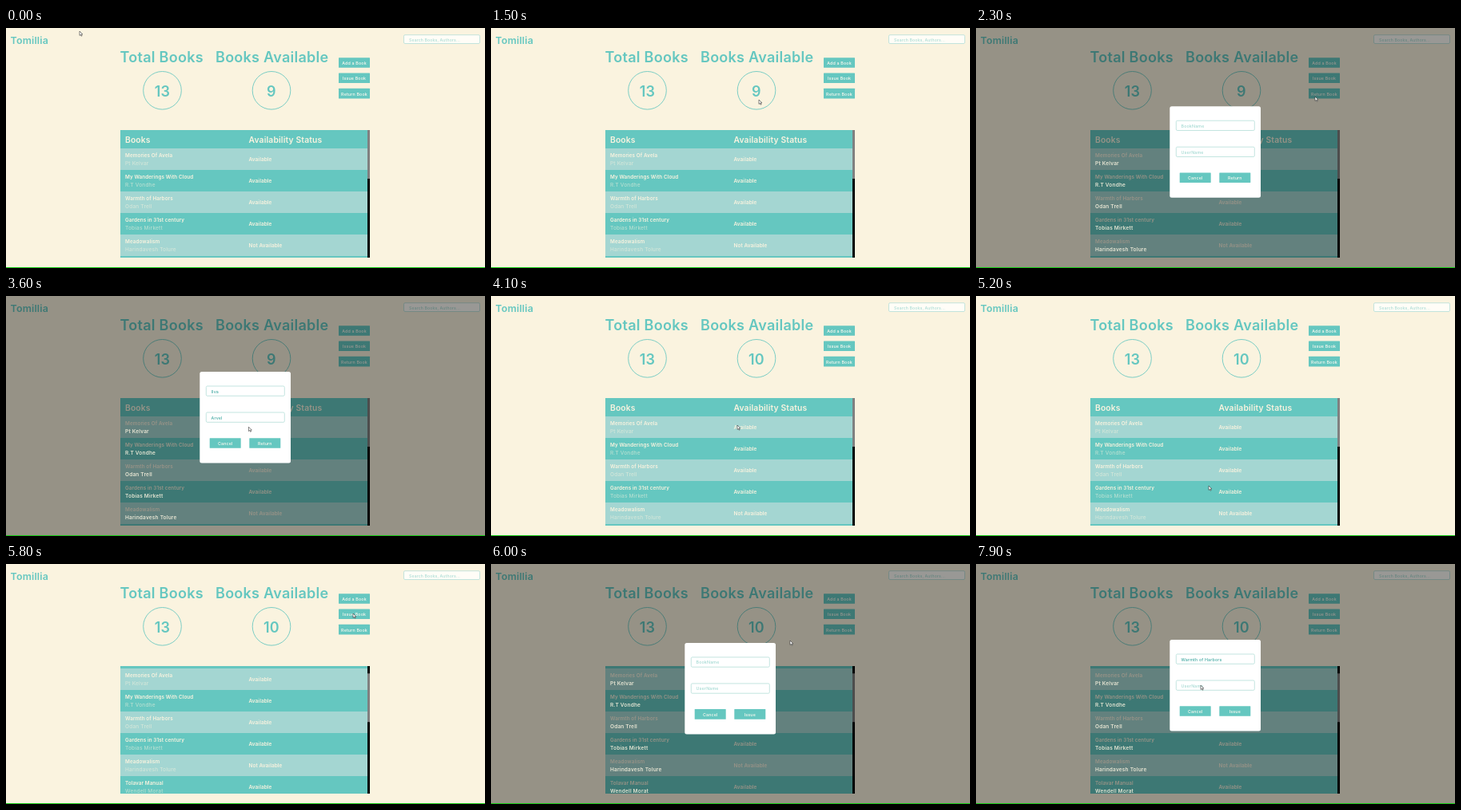
These frames come from a looping animation (599x301 px, 8 s). An HTML page:

```html
<!DOCTYPE html>
<html lang="en">
<head>
<meta charset="utf-8">
<title>Library dashboard</title>
<style>
  html, body { margin: 0; width: 100%; height: 100%; overflow: hidden; background: #faf3df; }
  svg { display: block; width: 599px; height: 301px; font: 500 6px Inter, "Liberation Sans", sans-serif; }
  text { white-space: pre; }
</style>
</head>
<body>
<svg id="stage" viewBox="0 0 599 301"></svg>
<script>
const TEAL = '#65c7c0', PALE = '#a4d6d2', CREAM = '#faf3df';
const LOOP = 8000, ROW = 27, HEAD = 23, TOP = 128, VIEW = 160, THUMB = 61;
const RETURNED = 9, RETURN_AT = 3850;

const books = [
  ['Memories Of Avela', 'Pt Kelvar'],
  ['My Wanderings With Cloud', 'R.T Vondhe'],
  ['Warmth of Harbors', 'Odan Trell'],
  ['Gardens in 31st century', 'Tobias Mirkett'],
  ['Meadowalism', 'Harindavesh Tolure', 1],
  ['Tolavar Manual', 'Wendell Morat'],
  ['Slow Orchard', 'Mira Soldane'],
  ['Perry Wicket', 'L.D Harnwell'],
  ['6 Ladles', 'Ketash Bhovar', 1],
  ['Ilva', 'Nell Corwyn'],
  ['Das Mondrad', 'Emil Vorn'],
  ['Fog and Copper', 'Ivo Drelskoy', 1],
  ['Kettleconics', 'Bruno P Haskel']
];
const MAX_SCROLL = HEAD + books.length * ROW - VIEW;

const stage = document.getElementById('stage');

function add(parent, tag, attrs = {}) {
  const el = document.createElementNS('http://www.w3.org/2000/svg', tag);
  set(el, attrs);
  parent.append(el);
  return el;
}
function set(el, attrs) {
  for (const key in attrs) el.setAttribute(key, attrs[key]);
}
const rect = (parent, x, y, width, height, fill, more) =>
  add(parent, 'rect', { x, y, width, height, fill, ...more });

// cy is the middle of the capitals
function label(parent, str, x, cy, size, fill, more) {
  const el = add(parent, 'text', { x, y: cy + size * 0.364, 'font-size': size, fill, ...more });
  el.textContent = str;
  return el;
}
const MID = { 'text-anchor': 'middle' };
const BOLD = { 'font-weight': 600, 'letter-spacing': '0.015em' };
const WIDE = { 'letter-spacing': '0.03em' };

function button(parent, str, x, y) {
  rect(parent, x, y, 39, 12.6, TEAL, { rx: 0.5 });
  return label(parent, str, x + 19.5, y + 6.8, 5.3, '#fffaf0', { ...MID, ...WIDE });
}
function field(parent, x, y, width, height, fill) {
  rect(parent, x, y, width, height, fill, { rx: 1.5, stroke: '#b4dfd8', 'stroke-width': 0.8 });
}

// Page
const page = add(stage, 'g');
rect(page, 0, 0, 599, 301, CREAM);
label(page, 'Tomillia', 5.5, 15.2, 12.4, TEAL, BOLD);
field(page, 497.5, 8.7, 95, 10.8, '#fffdf7');
label(page, 'Search Books, Authors...', 504, 14.7, 5.1, '#a9dcd5', WIDE);

function counter(title, x, cx, value) {
  label(page, title, x, 36.7, 18, TEAL, BOLD);
  add(page, 'circle', { cx, cy: 78.3, r: 23.8, fill: 'none', stroke: TEAL, 'stroke-width': 0.85 });
  return label(page, value, cx, 79.2, 18, TEAL, { ...MID, ...BOLD });
}
counter('Total Books', 142.5, 195.5, 13);
const available = counter('Books Available', 262, 332, 9);
['Add a Book', 'Issue Book', 'Return Book'].forEach((s, i) => button(page, s, 416, 37.2 + i * 19.3));

// Table
rect(add(add(stage, 'defs'), 'clipPath', { id: 'view' }), 143, TOP, 309, VIEW);
const clipped = parent => add(add(parent, 'g', { 'clip-path': 'url(#view)' }), 'g');
const table = clipped(page);
rect(table, 143, TOP, 309, HEAD, TEAL);
label(table, 'Books', 149, 140.2, 10.3, CREAM, BOLD);
label(table, 'Availability Status', 303.5, 140.2, 10.3, CREAM, BOLD);
rect(page, 452, TOP, 3, VIEW, '#000');
const thumb = rect(page, 452, TOP, 3, THUMB, '#808080');

const shade = rect(stage, 0, 0, 599, 301, '#000');
const authors = clipped(stage);
const statuses = books.map(([title, author, out], i) => {
  const y = TOP + HEAD + i * ROW;
  rect(table, 143, y, 309, ROW, i % 2 ? TEAL : PALE);
  label(table, title, 149, y + 9.2, 6.3, CREAM, BOLD);
  label(authors, author, 149, y + 18.3, 6.5, CREAM, WIDE);
  return label(table, out ? 'Not Available' : 'Available', 303.5, y + 14, 6.4, CREAM, BOLD);
});

// Dialog, drawn at its resting place
const dialog = add(stage, 'g');
rect(dialog, 242.3, 95, 113.7, 114.5, '#fff', { rx: 2.5 });
const inputs = [113, 146].map(y => {
  field(dialog, 250.3, y, 98, 12.3, '#fff');
  return label(dialog, '', 256.5, y + 6.6, 5.3, TEAL, WIDE);
});
button(dialog, 'Cancel', 254.7, 178.2);
const action = button(dialog, '', 304.3, 178.2);

rect(stage, 0, 300, 599, 1, '#14c814');
const cursor = add(stage, 'path', {
  d: 'M0 0V5.4L1.3 4.3 2.2 6.2 3.1 5.8 2.2 3.9H3.9Z',
  fill: '#fff', stroke: '#333', 'stroke-width': 0.6
});

// Timeline
const pointer = [
  [0, 92, 4], [200, 92, 4], [1000, 190, 60], [1500, 335, 90], [2000, 424, 86], [2320, 424, 86],
  [2550, 296, 120], [3000, 296, 120], [3200, 292, 152], [3500, 292, 152], [3750, 324, 186],
  [3850, 324, 186], [4100, 308, 162], [4600, 318, 166], [4800, 318, 168], [5200, 291, 238],
  [5400, 300, 215], [5730, 434, 62], [5820, 434, 62], [6000, 374, 96], [6400, 290, 119],
  [7100, 290, 119], [7500, 281, 152], [8000, 281, 152]
];
const scrolling = [
  [0, 0], [4200, 0], [4560, MAX_SCROLL], [4780, MAX_SCROLL], [5150, 0],
  [5300, 0], [5480, 20], [8000, 20]
];
const dialogs = [
  { open: 2100, close: RETURN_AT, action: 'Return', typing: [['Ilva', 2600, 3000], ['Arvel', 3200, 3500]] },
  { open: 5820, close: 9000, action: 'Issue', typing: [['Warmth of Harbors', 6500, 7050], ['', 8000, 9000]] }
];

const clamp = v => Math.min(1, Math.max(0, v));

function at(keys, t) {
  const i = Math.max(1, keys.findIndex(k => k[0] > t));
  const [a, b] = [keys[i - 1], keys[i]];
  const u = clamp((t - a[0]) / (b[0] - a[0])), e = u * u * (3 - 2 * u);
  return a.slice(1).map((v, j) => v + (b[j + 1] - v) * e);
}

function drawDialog(t) {
  const d = dialogs.find(d => t >= d.open && t < d.close + 200);
  const shown = d ? clamp((t - d.open) / 150) * clamp((d.close + 200 - t) / 200) : 0;
  set(shade, { opacity: 0.4 * shown });
  set(authors, { opacity: 0.53 + 0.35 * shown, 'font-weight': shown > 0.5 ? 600 : 500 });
  set(dialog, { opacity: shown });
  if (!d) return;
  const drop = 15 * (1 - clamp((t - d.open) / 500)) ** 3;
  set(dialog, { transform: `translate(0 ${drop})` });
  action.textContent = d.action;
  d.typing.forEach(([str, from, to], i) => {
    const typed = str.slice(0, Math.ceil(clamp((t - from) / (to - from)) * str.length));
    inputs[i].textContent = typed || ['BookName', 'UserName'][i];
    set(inputs[i], { fill: typed ? '#45aaa3' : '#a3d9d2' });
  });
}

function draw(t) {
  const [scroll] = at(scrolling, t), [x, y] = at(pointer, t);
  const back = t >= RETURN_AT;
  available.textContent = back ? 10 : 9;
  statuses[RETURNED].textContent = back ? 'Available' : 'Not Available';
  for (const g of [table, authors]) set(g, { transform: `translate(0 ${-scroll})` });
  set(thumb, { y: TOP + scroll / MAX_SCROLL * (VIEW - THUMB) });
  set(cursor, { transform: `translate(${x} ${y})` });
  drawDialog(t);
}

const start = performance.now();
(function tick() {
  draw((performance.now() - start) % LOOP);
  requestAnimationFrame(tick);
})();
</script>
</body>
</html>
```
